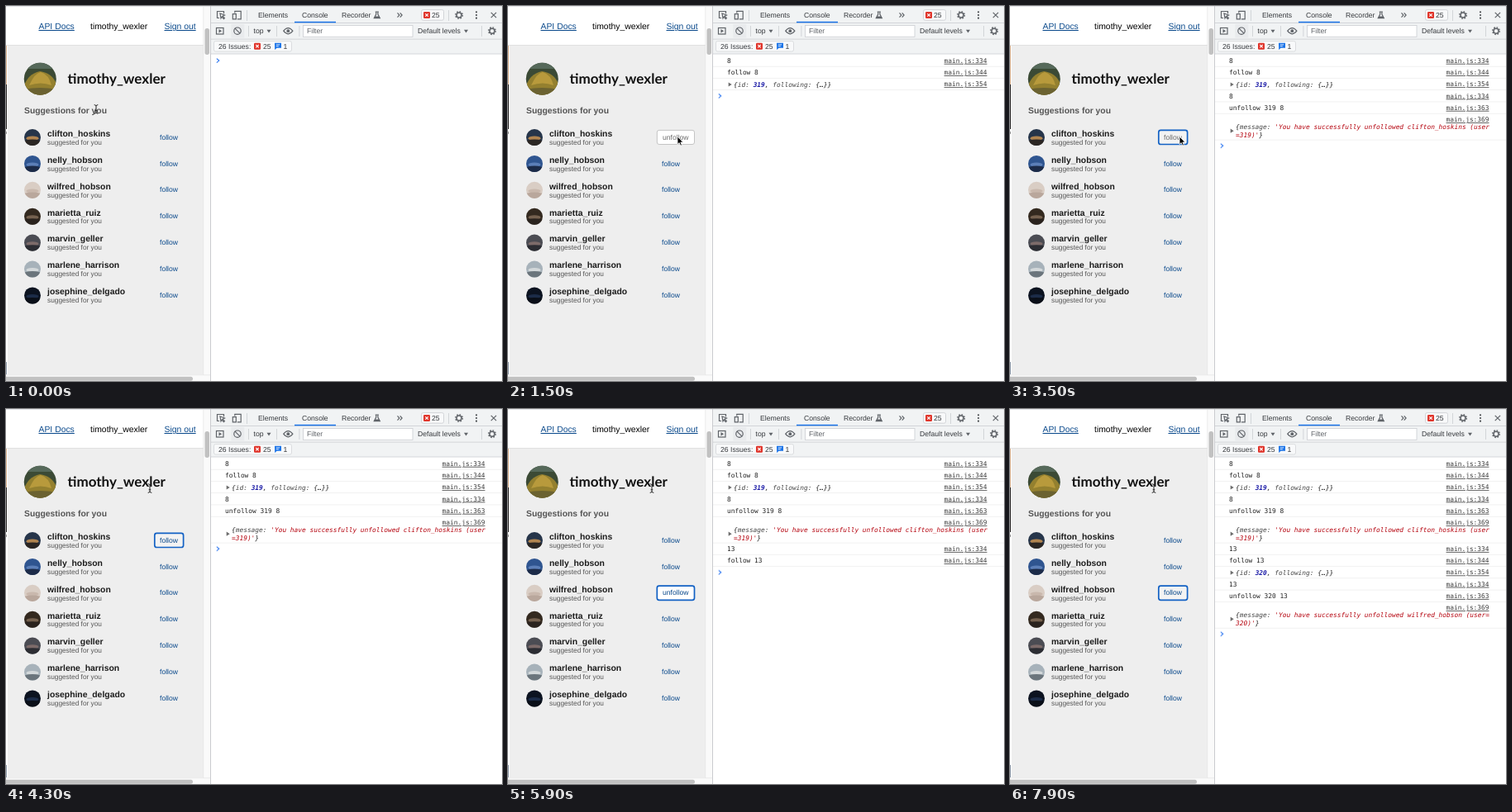
These frames come from a looping animation (600x454 px, 8000 ms). An HTML page:

```html
<!DOCTYPE html>
<html lang="en">
<head>
<meta charset="utf-8">
<title>Follow suggestions with console</title>
<style>
  html, body { margin: 0; width: 100%; height: 100%; overflow: hidden; background: #fff; }
  svg { display: block; width: 600px; height: 454px; }
  text { font-family: "Liberation Sans", Arial, sans-serif; white-space: pre; text-rendering: geometricPrecision; }
  .nav { font-size: 10.4px; }
  .link { fill: #0b4a8c; text-decoration: underline; }
  .title { font: 700 17px Lato, sans-serif; fill: #111; }
  .sub { font-size: 10.35px; font-weight: bold; fill: #555; }
  .user { font-size: 10.4px; font-weight: bold; fill: #1c1c1c; }
  .note { font-size: 8.3px; fill: #555; }
  .act { font-size: 8.6px; fill: #0b4a8c; }
  .act.hover { fill: #6c6c6c; }
  .ui { font-size: 8.65px; fill: #35383c; }
  .mono { font: 7.85px "DejaVu Sans Mono", monospace; fill: #222; }
  .src { fill: #3c3c3c; text-decoration: underline; }
  .obj { font-style: italic; fill: #222; }
  .key { fill: #444; }
  .num { fill: #1a1aa6; font-weight: bold; }
  .str { fill: #b4000c; }
  .ico { fill: none; stroke: #5f6368; stroke-width: 1.2; }
  #cursor { animation: move 8s ease-in-out infinite; }
  @keyframes move {
    0%, 2.5% { transform: translate(109px, 125px); }
    10%, 46.25% { transform: translate(205px, 158px); }
    53.75%, 100% { transform: translate(174px, 96px); }
  }
</style>
</head>
<body>
<svg id="stage" viewBox="0 0 600 454" xmlns="http://www.w3.org/2000/svg"></svg>
<script>
const LOOP = 8000;
const CLICK = 1100, DONE1 = 1400, UNDO1 = 2900, DONE2 = 3200, TAB1 = 4600, TAB2 = 4800,
      ENTER = 5700, DONE3 = 6100, UNDO2 = 7400, DONE4 = 7700;
const css = [];
const pct = t => t / LOOP * 100 + '%';

const text = (x, y, cls, s, attr = '') => `<text x="${x}" y="${y}" class="${cls}" ${attr}>${s}</text>`;
const rect = (x, y, w, h, fill, attr = '') =>
  `<rect x="${x}" y="${y}" width="${w}" height="${h}" fill="${fill}" ${attr}/>`;
const path = (d, attr = 'class="ico"') => `<path d="${d}" ${attr}/>`;
const circle = (x, y, r, attr) => `<circle cx="${x}" cy="${y}" r="${r}" ${attr}/>`;

// Show markup only between two times of the loop.
function during(from, to, body) {
  if (from === 0 && to === LOOP) return body;
  const name = `show-${from}-${to}`;
  css.push(`@keyframes ${name} { 0% { visibility: ${from ? 'hidden' : 'visible'} }
    ${pct(from)} { visibility: visible } ${to < LOOP ? pct(to) + ' { visibility: hidden }' : ''} }`);
  return `<g style="animation: ${name} 8s step-end infinite">${body}</g>`;
}

/* ---------- page ---------- */
const me = 'timothy_wexler';
const users = ['clifton_hoskins', 'nelly_hobson', 'wilfred_hobson', 'marietta_ruiz',
  'marvin_geller', 'marlene_harrison', 'josephine_delgado'];
const photos = [ // sky, middle, ground
  ['#26354a', '#b08450', '#2b2623'], ['#2f5590', '#5c7fb8', '#1c2b48'],
  ['#d9cdc4', '#c9b8ad', '#b9a79c'], ['#33291f', '#75614f', '#2a231e'],
  ['#4b4c53', '#7d6b6a', '#2c2d33'], ['#a7b2ba', '#d3d8da', '#6b757c'],
  ['#0c1320', '#1c2c48', '#0a0f18']];
const rowY = i => 158.7 + 31.9 * i;

function avatar(i) {
  const y = rowY(i), [sky, mid, ground] = photos[i];
  return circle(32, y + .3, 10, `fill="${sky}"`) +
    `<ellipse cx="32" cy="${y + 1.5}" rx="7.5" ry="2.6" fill="${mid}"/>` +
    path(`M22.8 ${y + 4.3}Q32 ${y + 1.5} 41.2 ${y + 4.3}A10 10 0 0 1 22.8 ${y + 4.3}`, `fill="${ground}"`);
}

function button(i, from, to, { label = 'follow', hover = false, ring = false } = {}) {
  const y = rowY(i), on = label === 'unfollow';
  const x = on ? 180.3 : 179.8, w = on ? 45.2 : 34.8;
  let box = '';
  if (ring) box = rect(x, y - 8.3, w, 17.1, on ? '#fff' : '#f3f3f3', 'rx="2.5" stroke="#1261c4" stroke-width="1.7"');
  else if (on) box = rect(x, y - 8.3, w, 17.1, '#fff', 'rx="2.5" stroke="#c4c4c4"');
  return during(from, to, box + text(on ? 187 : 186, y + 2.9, hover ? 'act hover' : 'act', label));
}

function page() {
  let s = rect(0, 0, 248, 454, '#fff') + rect(0, 0, 248, 1, '#e3e5e8');
  s += text(39.5, 28, 'nav link', 'API Docs') + text(102, 28, 'nav', me) + text(191.5, 28, 'nav link', 'Sign out');
  s += rect(2, 47, 237, 399.5, '#eeeeee') + rect(0, 47, 239, .8, '#dedede');
  s += rect(0, 48, 1, 47, '#dcb592') + rect(0, 95, 1, 54, '#2b2929') + rect(0, 152, 1, 3, '#999') +
       rect(0, 431, 1, 15, '#8f9cab');
  s += rect(239, 1, 8, 446, '#fafafa') + rect(238.5, 1, .7, 446, '#e4e4e4') + rect(240.5, 27, 5.5, 32, '#c1c1c1', 'rx="2.7"');
  s += rect(0, 447, 247, 7, '#fafafa') + rect(0, 446.5, 247, .7, '#e4e4e4') + rect(-4, 448.7, 230, 5, '#c1c1c1', 'rx="2.5"');
  s += `<clipPath id="round">${circle(41.3, 88.3, 19.5, '')}</clipPath><g clip-path="url(#round)">` +
    rect(21, 68, 41, 41, '#3b4a35') + rect(21, 68, 41, 8, '#56695a') +
    path('M21 99Q26 82 41 79Q57 81 62 97V109H21Z', 'fill="#94802f"') +
    path('M28 96Q35 81 42 80Q52 83 55 96Q42 91 28 96Z', 'fill="#b89a3c"') +
    path('M21 101Q41 97 62 101V109H21Z', 'fill="#6b6231"') + '</g>';
  s += text(74.5, 94.3, 'title', me) + text(22, 130, 'sub', 'Suggestions for you');
  users.forEach((u, i) => {
    s += avatar(i) + text(50, rowY(i) - .9, 'user', u) + text(50, rowY(i) + 9, 'note', 'suggested for you');
    if (i > 2) s += button(i, 0, LOOP);
  });
  s += button(0, 0, 800) + button(0, 800, CLICK, { hover: true }) +
    button(0, CLICK, UNDO1, { label: 'unfollow', hover: true }) +
    button(0, UNDO1, 3800, { hover: true, ring: true }) +
    button(0, 3800, TAB1, { ring: true }) + button(0, TAB1, LOOP);
  s += button(1, 0, TAB1) + button(1, TAB1, TAB2, { ring: true }) + button(1, TAB2, LOOP);
  s += button(2, 0, TAB2) + button(2, TAB2, ENTER, { ring: true }) +
    button(2, ENTER, UNDO2, { label: 'unfollow', ring: true }) + button(2, UNDO2, LOOP, { ring: true });
  return s;
}

/* ---------- developer tools ---------- */
const gear = (x, y) => circle(x, y, 3, 'class="ico" style="stroke-width:1.5"') +
  circle(x, y, 4.3, 'class="ico" style="stroke-width:1.4" stroke-dasharray="1.69 1.69"');
const caret = (x, y) => path(`M${x} ${y}h5l-2.5 3.6z`, 'fill="#5f6368"');
const bar = (x, y) => rect(x, y, .8, 13, '#cbcdd1');
const error = (x, y) => rect(x, y, 8, 8, '#e0352b', 'rx="1.2"') +
  path(`M${x + 2.3} ${y + 2.3}l3.4 3.4m0-3.4l-3.4 3.4`, 'stroke="#fff" stroke-width="1.1"');

function toolbars() {
  let s = rect(247, 0, 353, 454, '#fff') + rect(248, 1, 352, 57, '#f1f3f4') + rect(247, 0, 353, 1, '#dfe1e5');
  for (const y of [20, 39.7, 57.6]) s += rect(248, y, 352, .8, '#cbcdd1');
  s += path('M258 14.5h-2.5v-8h8v2.7M259 9l5.5 2-2.3 1.2 2.2 2.5-1 .9-2.2-2.6-1.2 1.8z');
  s += path('M276.8 8.6V6.3h7.4v9.6h-4.4M274.3 9.6h4v6.3h-4z') + bar(291, 5);
  s += text(305, 14, 'ui', 'Elements') + text(358, 14, 'ui', 'Console') + text(406, 14, 'ui', 'Recorder');
  s += rect(349, 18.8, 50, 1.5, '#1a73e8');
  s += path('M447.7 7v3l-2.4 4.7h7l-2.4-4.7v-3M446.7 7h4.2') + path('M446.6 12.4h4.4l1.3 2.3h-7z', 'fill="#5f6368"');
  s += path('M473.5 8.3l2.4 2.7-2.4 2.7m3.2-5.4l2.4 2.7-2.4 2.7');
  s += rect(502.5, 4.6, 27, 12.6, '#f8f9fa', 'rx="2" stroke="#cbcdd1" stroke-width=".8"') + error(505, 7) + text(515, 14, 'ui', '25');
  s += bar(535, 5) + gear(548, 11);
  for (const y of [7.3, 11, 14.7]) s += circle(569, y, 1.1, 'fill="#4a4d51"');
  s += path('M586.7 7.8l6.4 6.4m0-6.4l-6.4 6.4');

  s += rect(254.5, 26.5, 8.5, 7.5, 'none', 'class="ico"') + path('M257.5 28l3.6 2.2-3.6 2.2z', 'fill="#5f6368"');
  s += rect(272.3, 22, 16, 16.5, '#e9ebed') + circle(280, 30.2, 4.2, 'class="ico"') + path('M277 27.2l6 6');
  s += bar(293, 24) + text(299.5, 33.2, 'ui', 'top') + caret(315.5, 28.8) + bar(327, 24);
  s += path('M335.7 30.2q5.6-7.2 11.2 0q-5.6 7.2-11.2 0z') + circle(341.3, 30.2, 1.9, 'fill="#5f6368"') + bar(354.5, 24);
  s += rect(359.5, 23.5, 132.5, 13.8, '#fff', 'stroke="#cbcdd1" stroke-width=".8"') + text(364, 33.4, 'ui', 'Filter', 'style="fill:#5f6368"');
  s += text(498, 33.2, 'ui', 'Default levels') + caret(554, 28.8) + bar(575, 24) + gear(588, 30.2);

  s += rect(251.5, 42.6, 94, 12.4, '#f8f9fa', 'rx="2" stroke="#d4d6d9" stroke-width=".8"');
  s += text(257, 52, 'ui', '26 Issues:') + error(300, 44.7) + text(311, 52, 'ui', '25');
  s += path('M325 44.7h8v6h-5.4l-2.4 2.2z', 'fill="#1a73e8"') + path('M326.8 46.8h4.4m-4.4 1.9h3', 'stroke="#fff" stroke-width=".8"');
  return s + text(335.5, 52, 'ui', '1');
}

const span = (cls, s) => `<tspan class="${cls}">${s}</tspan>`;
const preview = id => `{${span('key', 'id:')} ${span('num', id)}, ${span('key', 'following:')} {…}}`;
const notice = (user, head, tail) => [
  `{${span('key', 'message:')} ${span('str', `'You have successfully unfollowed ${user} ${head}`)}`,
  span('str', tail) + '}'];

const logs = [ // time, source line, text or object
  [CLICK, 334, '8'], [CLICK, 344, 'follow 8'], [DONE1, 354, [preview(319)]],
  [UNDO1, 334, '8'], [UNDO1, 363, 'unfollow 319 8'], [DONE2, 369, notice(users[0], '(user', "=319)'")],
  [ENTER, 334, '13'], [ENTER, 344, 'follow 13'], [DONE3, 354, [preview(320)]],
  [UNDO2, 334, '13'], [UNDO2, 363, 'unfollow 320 13'], [DONE4, 369, notice(users[2], '(user=', "320)'")]];

function consoleLog() {
  let y = 58.9, s = '';
  const stops = { 0: 0 };
  for (const [at, line, msg] of logs) {
    const isObject = Array.isArray(msg), tall = isObject && msg.length === 2, h = tall ? 31.9 : 14.25;
    let row = text(579.5, y + 9.9, 'mono src', `main.js:${line}`, 'text-anchor="end"');
    if (isObject) {
      const first = tall ? y + 19.1 : y + 10.4, mid = tall ? y + 21 : y + 7.6;
      msg.forEach((m, i) => row += text(273, first + 9.4 * i, 'mono obj', m));
      row += path(`M266.7 ${mid - 2.6}l4 2.6-4 2.6z`, 'fill="#6e6e6e"');
    } else row += text(265, y + 9.9, 'mono', msg);
    row += rect(248, y + h - .3, 352, .7, '#ececec');
    s += during(at, LOOP, row);
    y += h;
    stops[at] = y - 58.9;
  }
  const frames = Object.entries(stops).map(([t, dy]) => `${pct(t)} { transform: translateY(${dy}px) }`);
  css.push(`@keyframes prompt { ${frames.join(' ')} }`);
  return s + `<g style="animation: prompt 8s step-end infinite">` +
    path('M254.8 63.6l2.9 2.5-2.9 2.5', 'fill="none" stroke="#367cf1" stroke-width="1.2"') + '</g>';
}

/* ---------- pointer ---------- */
function pointer() {
  const beam = path('M-2.3-5.3q2 0 2.3 1.2q.3-1.2 2.3-1.2M0-4.5v9M-2.3 5.3q2 0 2.3-1.2q.3 1.2 2.3 1.2M-1.3 1.8h2.6',
    'fill="none" stroke="#222" stroke-width="1"');
  const arrow = path('M0 0v9.6l2.2-2 1.5 3.5 1.7-.7-1.5-3.4h3z', 'fill="#000" stroke="#fff" stroke-width=".8"');
  return `<g id="cursor">${during(0, 300, beam)}${during(300, 4200, arrow)}${during(4200, LOOP, beam)}</g>`;
}

document.getElementById('stage').innerHTML = page() + toolbars() + consoleLog() +
  rect(247, 0, .9, 454, '#c4c6ca') + pointer();
const sheet = document.createElement('style');
sheet.textContent = [...new Set(css)].join('\n');
document.head.append(sheet);
</script>
</body>
</html>
```
